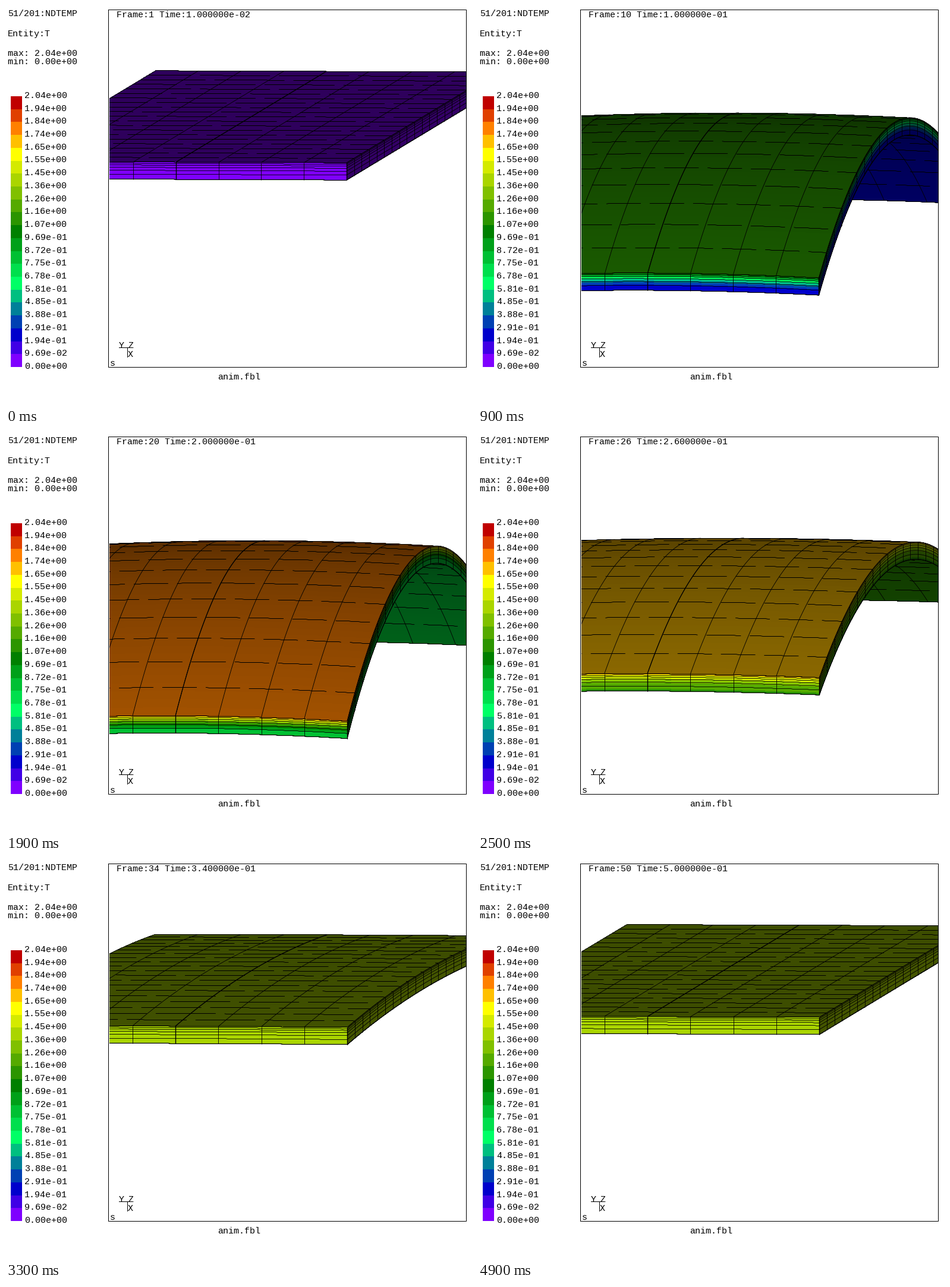
Recreate the animation shown at these times as a matplotlib script. Size 784 px wide and 672 px high, loop 5 s.

```python
import numpy as np
import matplotlib.pyplot as plt
from matplotlib.animation import FuncAnimation
from matplotlib.collections import LineCollection, PolyCollection
from matplotlib.patches import Rectangle

W, H, DPI = 784, 672, 100
PX = 72 / DPI
FRAMES, INTERVAL = 50, 100
T_MAX, BANDS = 2.035, 21
THICK, N_U, N_V = 29, 8, 20
HEAT_ON, HEAT_OFF = 2.42, 24.42

KEYS = [0, 2, 6, 10, 16, 18, 20]
KEY_RGB = np.array([(127, 0, 255), (0, 0, 204), (0, 255, 102), (0, 128, 0),
                    (255, 255, 0), (255, 128, 0), (192, 0, 0)]) / 255
PALETTE = np.column_stack([np.interp(range(BANDS), KEYS, KEY_RGB[:, c])
                           for c in range(3)])

# element layers grow thicker from the heated top to the bottom
LAYERS = np.concatenate([[0], np.cumsum(1.3 ** np.arange(6))])
LAYERS /= LAYERS[-1]
U = np.linspace(0, 1, 145)

fig = plt.figure(figsize=(W / DPI, H / DPI), dpi=DPI, facecolor="white")
ax = fig.add_axes([0, 0, 1, 1])
ax.set_xlim(0, W)
ax.set_ylim(H, 0)
ax.axis("off")


def label(x, baseline, text):
    return ax.text(x, baseline, text, family="Liberation Mono",
                   size=15 * PX, va="baseline", ha="left")


def stroke(xs, ys):
    ax.plot(np.array(xs) + .5, np.array(ys) + .5, color="black", lw=PX,
            snap=False, solid_capstyle="projecting",
            solid_joinstyle="miter")


def draw_static():
    label(3, 17, "51/201:NDTEMP")
    label(3, 51, "Entity:T")
    label(3, 84, "max: 2.04e+00")
    label(3, 98, "min: 0.00e+00")
    label(356, 629, "anim.fbl")
    label(175, 606, "s")
    step = 456 / BANDS
    for i, color in enumerate(PALETTE):
        ax.add_patch(Rectangle((8, 608 - (i + 1) * step), 19, step,
                               color=color, lw=0, antialiased=False))
    for i in range(BANDS + 1):
        label(31, 611 - i * 21.72, f"{T_MAX * i / BANDS:.2e}")
    stroke([172, 774, 774, 172, 172], [6, 6, 608, 608, 6])
    stroke([190, 210], [575, 575])
    stroke([204, 204], [575, 591])
    label(190, 576, "Y")
    label(205.5, 576, "Z")
    label(204.5, 591, "X")


draw_static()
title = label(186.5, 19, "")
clip = Rectangle((174, 8), 600, 599, transform=ax.transData)
parts = []


def rise(k, decay):
    return 1 - decay ** max(k, 0)


def slow_rise(k):
    return rise(k, .765)


def fast_rise(k):
    return rise(k, .62)


def bend_rise(k):
    return max(0, slow_rise(k) - .04 * np.exp(-k)) if k > 0 else 0


def pulse(response, n):
    return response(n - HEAT_ON) - response(n - HEAT_OFF)


class Plate:
    """Deformation and temperature of the plate at step n."""

    def __init__(self, n):
        self.mean = .064 * np.clip(n - 2.25, 0, 22)
        self.sag = 223 * pulse(bend_rise, n)
        self.top = self.mean + .634 * pulse(fast_rise, n)
        self.bottom = max(0, self.mean - .348 * pulse(slow_rise, n - .4))
        self.scale = 1 + .0053 * self.mean
        arch = .956 * self.sag
        # beyond the ridge the surface turns away from the viewer
        self.ridge = min(1, .5 + 153 * self.scale / (8 * arch)) if arch else 1

    def points(self, u, v, z):
        u, v, z = np.broadcast_arrays(u, v, z)
        p, q = u - .5, v - .5
        x = 412 + self.scale * (574.4 * p + 253.4 * q)
        y = (186 + self.scale * (2.3 * p - 153 * q) + THICK * z
             + self.sag * (.956 * 4 * q ** 2 + .036 * 4 * p ** 2 + .008))
        return np.column_stack([x + .5, y + .5])

    def row(self, v, z):
        """Line across the plate, stepped to whole pixel rows."""
        line = self.points(U, v, z)
        line[:, 1] = np.floor(line[:, 1]) + .5
        return line

    def color(self, z):
        t = self.bottom + (self.top - self.bottom) * (1 - z) ** 2
        return PALETTE[int(np.clip(t / T_MAX * BANDS, 0, BANDS - 1))]


def add(collection, z):
    collection.set_zorder(z)
    ax.add_collection(collection, autolim=False)
    collection.set_clip_path(clip)
    parts.append(collection)


def fill(polys, colors, z):
    add(PolyCollection(polys, facecolors=colors, edgecolors="none",
                       linewidths=0, antialiaseds=False), z)


def mesh(lines, z, width=.85, styles="solid"):
    add(LineCollection(lines, colors="black", linewidths=width * PX,
                       linestyles=styles), z)


def strip(a, b):
    return np.concatenate([a, b[::-1]])


def draw_skin(plate, v0, v1, depth, shade, z):
    """Top or bottom surface between two depth positions."""
    vs = np.linspace(v0, v1, 41)
    rows = [plate.points(U, v, depth) for v in vs]
    base = plate.color(depth)
    fill([strip(a, b) for a, b in zip(rows, rows[1:])],
         [base * shade((a + b) / 2) for a, b in zip(vs, vs[1:])], z)
    mesh([plate.points(u, vs, depth) for u in np.linspace(0, 1, N_U + 1)], z + .1)
    mesh([plate.points(.5, vs, depth)], z + .1, 1.2)
    ids = [i for i in range(N_V + 1) if v0 <= i / N_V <= v1]
    dash = 58 + 60 * max(0, 1 - plate.sag / 60)
    mesh([plate.row(i / N_V, depth) for i in ids], z + .1, 1,
         [(i * 37 % 73, (dash, 15)) for i in ids])
    mesh([plate.row(v0, depth), plate.row(v1, depth)], z + .1, 1)


def draw_edge(plate, curve, lines, ribs, shade, z):
    """Cut face through the thickness, coloured in temperature bands."""
    zs = np.linspace(0, 1, 30)
    rows = [curve(d) for d in zs]
    fill([strip(a, b) for a, b in zip(rows, rows[1:])],
         [plate.color((a + b) / 2) * shade for a, b in zip(zs, zs[1:])], z)
    mesh(lines, z + .1)
    mesh([lines[0], lines[-1]], z + .1, 1.2)
    mesh(ribs, z + .1)


def update(i):
    while parts:
        parts.pop().remove()
    n = i + 1
    plate = Plate(n)
    title.set_text(f"Frame:{n} Time:{n / 100:.6e}")
    tilt = plate.sag / 210
    ends = np.array([0, 1])
    vs = np.linspace(0, 1, 61)

    if plate.ridge < 1:
        draw_skin(plate, plate.ridge, 1, 1,
                  lambda v: .31 + .18 * (2 * v - 1) * tilt, 2)
    draw_edge(plate, lambda d: plate.points(1, vs, d),
              [plate.points(1, vs, d) for d in LAYERS],
              [plate.points(1, v, ends) for v in np.linspace(0, 1, N_V + 1)],
              .4, 3)
    draw_skin(plate, 0, plate.ridge, 0,
              lambda v: .36 + .26 * max(0, 1 - 2 * v) * tilt, 4)
    draw_edge(plate, lambda d: plate.points(U, 0, d),
              [plate.row(0, d) for d in LAYERS],
              [plate.points(u, 0, ends) for u in np.linspace(0, 1, N_U + 1)],
              1, 5)
    mesh([plate.points(.5, 0, ends), plate.points(1, 0, ends)], 6, 1.4)
    mesh([plate.points(1, vs, 0)], 6)
    return parts


anim = FuncAnimation(fig, update, frames=FRAMES, interval=INTERVAL,
                     init_func=lambda: [], repeat=True, repeat_delay=0)
plt.show()
```
